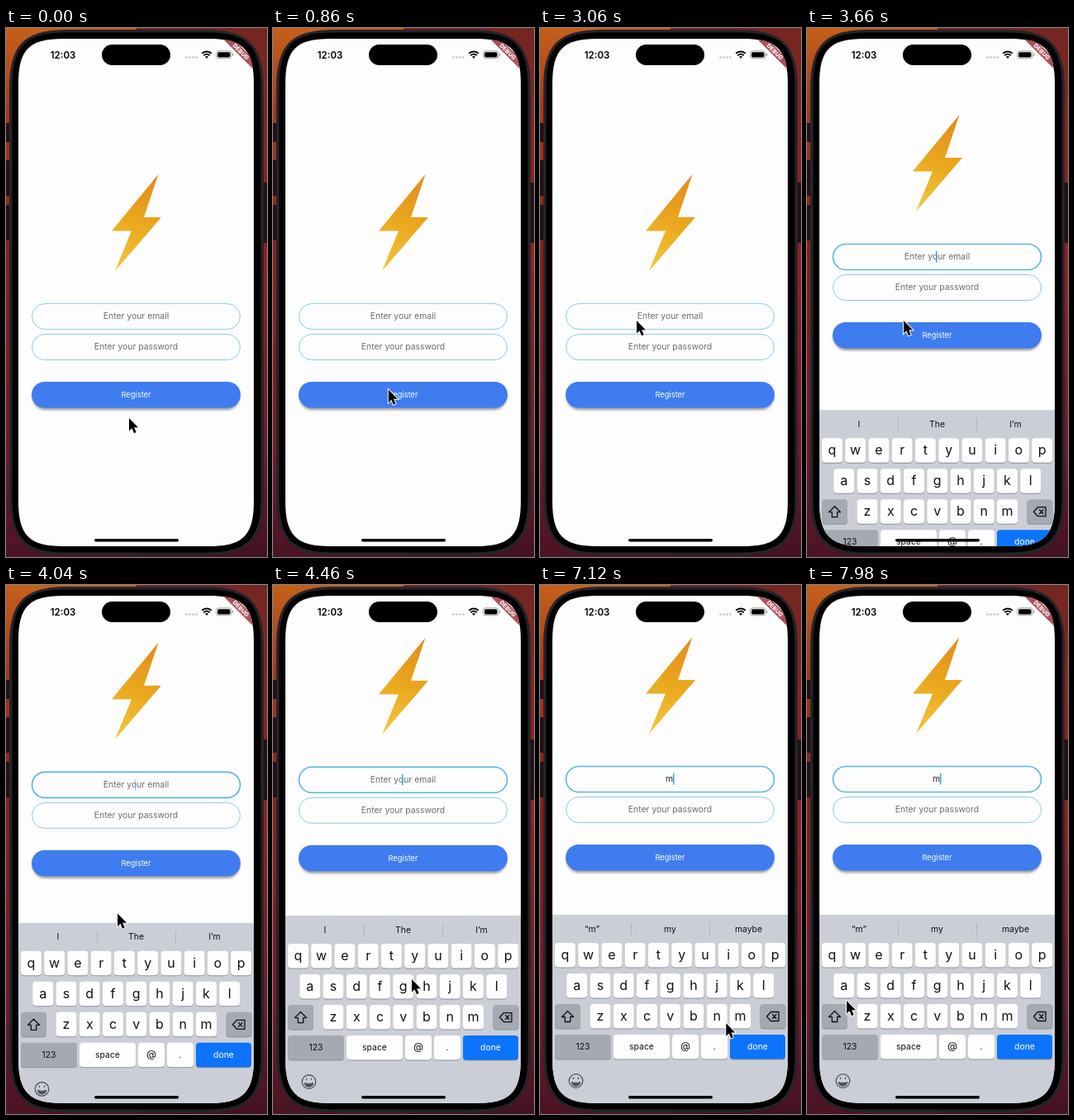
Recreate the animation shown at these times as an HTML page. Size 316 by 640 pixels, loop 8000 ms.

```html
<!DOCTYPE html>
<html lang="en">
<head>
<meta charset="utf-8">
<title>Register screen</title>
<style>
html, body { margin: 0; width: 100%; height: 100%; overflow: hidden; background: #000; }
svg { display: block; width: 100%; height: 100%; }
text { font-family: Inter, Roboto, sans-serif; text-anchor: middle; }
.hint { font-size: 10.4px; fill: #6c6c6e; }
.key { font-size: 16px; fill: #101012; }
.small { font-size: 10.4px; fill: #101012; }
.field { fill: none; stroke: #8cccee; stroke-width: 1; }
.icon { fill: none; stroke: #101012; stroke-width: 1.3; stroke-linejoin: round; stroke-linecap: round; }
</style>
</head>
<body>
<svg viewBox="0 0 316 640" preserveAspectRatio="none">
  <defs>
    <linearGradient id="left" x2="0" y2="1">
      <stop stop-color="#c4601a"/><stop offset=".15" stop-color="#a83a1a"/>
      <stop offset=".42" stop-color="#86201e"/><stop offset=".8" stop-color="#741a26"/>
      <stop offset="1" stop-color="#4a1424"/>
    </linearGradient>
    <linearGradient id="right" x2="0" y2="1">
      <stop stop-color="#742620"/><stop offset=".25" stop-color="#8a2420"/>
      <stop offset=".45" stop-color="#932022"/><stop offset=".8" stop-color="#701a28"/>
      <stop offset="1" stop-color="#421222"/>
    </linearGradient>
    <linearGradient id="gold" gradientUnits="userSpaceOnUse" x1="180" y1="178" x2="136" y2="292">
      <stop stop-color="#e38a1c"/><stop offset=".5" stop-color="#eaa81e"/>
      <stop offset="1" stop-color="#f2c63c"/>
    </linearGradient>
    <clipPath id="screen"><path id="glass"/></clipPath>
    <filter id="soft" x="-10%" y="-50%" width="120%" height="200%"><feGaussianBlur stdDeviation="1.6"/></filter>
  </defs>

  <rect width="158" height="640" fill="url(#left)"/>
  <rect x="158" width="158" height="640" fill="url(#right)"/>
  <g fill="#241014">
    <rect y="115" width="6" height="23"/>
    <rect y="160" width="6" height="43"/>
    <rect y="214" width="6" height="43"/>
    <rect x="311" y="187" width="5" height="73"/>
  </g>
  <path id="rim" fill="#25242b"/>
  <path id="bezel"/>

  <g clip-path="url(#screen)">
    <rect x="15" y="13" width="285" height="614" fill="#fdfdfd"/>
    <g id="form">
      <path d="M184.500 177L128 245.500H152L132 294L188 229H167Z" fill="url(#gold)"/>
      <rect id="email" class="field" x="31.500" y="333.500" width="252" height="31" rx="15.500"/>
      <text id="emailText" class="hint" x="157.500" y="352.200">Enter your email</text>
      <rect id="caret" x="156" y="342" width="1.500" height="13.500" fill="#3f9fdf"/>
      <rect class="field" x="31.500" y="370.500" width="252" height="31" rx="15.500"/>
      <text class="hint" x="157.500" y="389.200">Enter your password</text>
      <rect x="32" y="431" width="251" height="31" rx="15.500" fill="#55555c" opacity=".6" filter="url(#soft)"/>
      <rect x="31" y="428" width="253" height="31.500" rx="15.700" fill="#3f7cf0"/>
      <text x="157.500" y="447" font-size="9.300" fill="#fff">Register</text>
    </g>
    <g id="keyboard"></g>
    <g transform="translate(300 13) rotate(45)">
      <rect x="-40" y="17.700" width="80" height="8.800" fill="#b0505a"/>
      <text y="24.600" font-size="7" font-weight="800" fill="#fff">DEBUG</text>
    </g>
  </g>

  <text x="69" y="36.700" font-size="11.500" font-weight="600">12:03</text>
  <rect x="116" y="20" width="83" height="25" rx="12.500"/>
  <g fill="#c2c2c6">
    <circle cx="218.500" cy="35.500" r="1.300"/><circle cx="222.500" cy="35.500" r="1.300"/>
    <circle cx="226.500" cy="35.500" r="1.300"/><circle cx="230.500" cy="35.500" r="1.300"/>
  </g>
  <g fill="none" stroke="#000" stroke-width="1.900">
    <path d="M237.200 30.800a8.300 8.300 0 0 1 11.600 0M239.300 33.300a5.300 5.300 0 0 1 7.400 0"/>
    <path d="M241 34.800a3 3 0 0 1 4 0L243 37Z" fill="#000" stroke="none"/>
  </g>
  <rect x="254.500" y="27.800" width="18.500" height="9" rx="2.800" fill="none" stroke="#98989c" stroke-width=".9"/>
  <rect x="256" y="29.200" width="15.500" height="6.200" rx="1.600"/>
  <rect x="274" y="30.800" width="1.200" height="3" rx=".6" fill="#98989c"/>
  <rect x="107" y="618" width="102" height="3.400" rx="1.700"/>

  <path id="cursor" d="M0 0V15.600L3.500 12.300L6 18.200L8.600 17.100L6.200 11.300H11Z" stroke="#fff" stroke-width="1.900" paint-order="stroke"/>
</svg>

<script>
const LOOP = 8000, KEYBOARD = 228;
const FOCUS = 3253, BLINK = 3460, TYPED = 6900;
const $ = id => document.getElementById(id);

// Rectangle with continuous corners that run c along each side
function squircle(x, y, w, h, c) {
  const k = c * 0.245, s = w - 2 * c, v = h - 2 * c;
  return `M${x + c} ${y}h${s}c${c - k} 0 ${c} ${k} ${c} ${c}v${v}c0 ${c - k} ${-k} ${c} ${-c} ${c}` +
    `h${-s}c${k - c} 0 ${-c} ${-k} ${-c} ${-c}v${-v}c0 ${k - c} ${k} ${-c} ${c} ${-c}Z`;
}
$('rim').setAttribute('d', squircle(4, 2, 308, 636, 72));
$('bezel').setAttribute('d', squircle(7.5, 5.5, 301, 629, 66));
$('glass').setAttribute('d', squircle(15, 13, 285, 614, 54));

// Keyboard
const WHITE = '#fefefe', GREY = '#a5a9b2', BLUE = '#0b74fa';
const label = (s, x, y, cls, extra = '') => `<text class="${cls}" x="${x}" y="${y}" ${extra}>${s}</text>`;
const cap = (x, y, w, fill = WHITE) =>
  `<rect x="${x}" y="${y + 1}" width="${w}" height="29.500" rx="4" fill="#8c8f96"/>` +
  `<rect x="${x}" y="${y}" width="${w}" height="29.500" rx="4" fill="${fill}"/>`;
const row = (letters, x, y) => [...letters].map((c, i) => {
  const cx = x + i * 28.25;
  return cap(cx - 12.5, y, 25) + label(c, cx, y + 20, 'key');
}).join('');
const wide = (s, x, w, fill, style = '') =>
  cap(x, 544, w, fill) + label(s, x + w / 2, 562.2, 'small', `style="${style}"`);

$('keyboard').innerHTML =
  `<rect x="15" y="399" width="285" height="232" fill="#cbced6"/>` +
  `<path d="M110.500 409V424M205.500 409V424" stroke="#b2b5bc"/>` +
  [63, 157.5, 252.5].map(x => label('', x, 419.5, 'small word')).join('') +
  row('qwertyuiop', 30.4, 433) + row('asdfghjkl', 44.7, 470) + row('zxcvbnm', 73, 507) +
  cap(18, 507, 31, GREY) + cap(266.5, 507, 31, GREY) +
  `<path class="icon" d="M33.500 515.500L26.500 522.500H30.300V528.500H36.700V522.500H40.500Z"/>` +
  `<path class="icon" d="M274.500 522L279.500 516.500H289V527.500H279.500ZM281.500 519.500L286 524.500M286 519.500L281.500 524.500"/>` +
  wide('123', 18, 68, GREY) + wide('space', 89, 68) + wide('@', 160, 32, WHITE, 'font-size:12.5px') +
  wide('.', 195, 32) + wide('done', 230, 67, BLUE, 'fill:#fff') +
  `<g class="icon" style="stroke:#505358"><circle cx="43.500" cy="600" r="8.300"/>` +
  `<path d="M38.500 601.500Q43.500 603.500 48.500 601.500A5 4.500 0 0 1 38.500 601.500Z" fill="#505358"/>` +
  `<path d="M40.500 596V597.500M46.500 596V597.500"/></g>`;
const words = document.querySelectorAll('.word');

// Pointer stops: time, x, y
const path = [
  [0, 149, 472], [500, 149, 472], [1500, 118, 356], [1940, 118, 356], [2400, 117, 354],
  [3760, 117, 354], [4460, 168, 477], [5600, 237, 532], [7000, 237, 532],
  [7800, 48, 503], [LOOP, 48, 503]
];
const ease = p => p * p * (3 - 2 * p);
function pointer(t) {
  const i = path.findIndex(p => p[0] > t);
  const [t0, x0, y0] = path[i - 1], [t1, x1, y1] = path[i];
  const p = ease((t - t0) / (t1 - t0));
  return [x0 + (x1 - x0) * p, y0 + (y1 - y0) * p];
}

// Critically damped spring, 0 to 1
function spring(ms) {
  const x = Math.max(0, ms) * 0.00625;
  return 1 - (1 + x) * Math.exp(-x);
}

// Solid for half a second, fade out, pause, fade in
function blink(ms) {
  const p = Math.max(0, ms) % 1000;
  if (p < 500) return 1;
  return p < 750 ? Math.max(0, 1 - (p - 500) / 150) : Math.max(0, (p - 850) / 150);
}

function draw(t) {
  const focused = t >= FOCUS, typed = t >= TYPED;
  const up = KEYBOARD * (1 - spring(t - FOCUS));
  $('keyboard').setAttribute('transform', `translate(0 ${up})`);
  $('keyboard').style.display = focused ? '' : 'none';
  $('form').setAttribute('transform', `translate(0 ${-KEYBOARD / 2 * spring(t - FOCUS - 65)})`);

  $('email').style.stroke = focused ? '#58b6e4' : '';
  $('email').style.strokeWidth = focused ? 1.6 : '';
  $('emailText').textContent = typed ? 'm' : 'Enter your email';
  $('emailText').setAttribute('x', typed ? 156.5 : 157.5);
  $('emailText').style.fill = typed ? '#242426' : '';
  $('caret').setAttribute('x', typed ? 161 : 156);
  $('caret').setAttribute('opacity', focused ? blink(t - (typed ? TYPED : BLINK)) : 0);

  const list = typed ? ['“m”', 'my', 'maybe'] : ['I', 'The', 'I’m'];
  words.forEach((w, i) => w.textContent = list[i]);

  $('cursor').setAttribute('transform', `translate(${pointer(t)})`);
}

const start = performance.now();
function tick(now) {
  draw(Math.max(0, now - start) % LOOP);
  requestAnimationFrame(tick);
}
draw(0);
requestAnimationFrame(tick);
</script>
</body>
</html>
```
